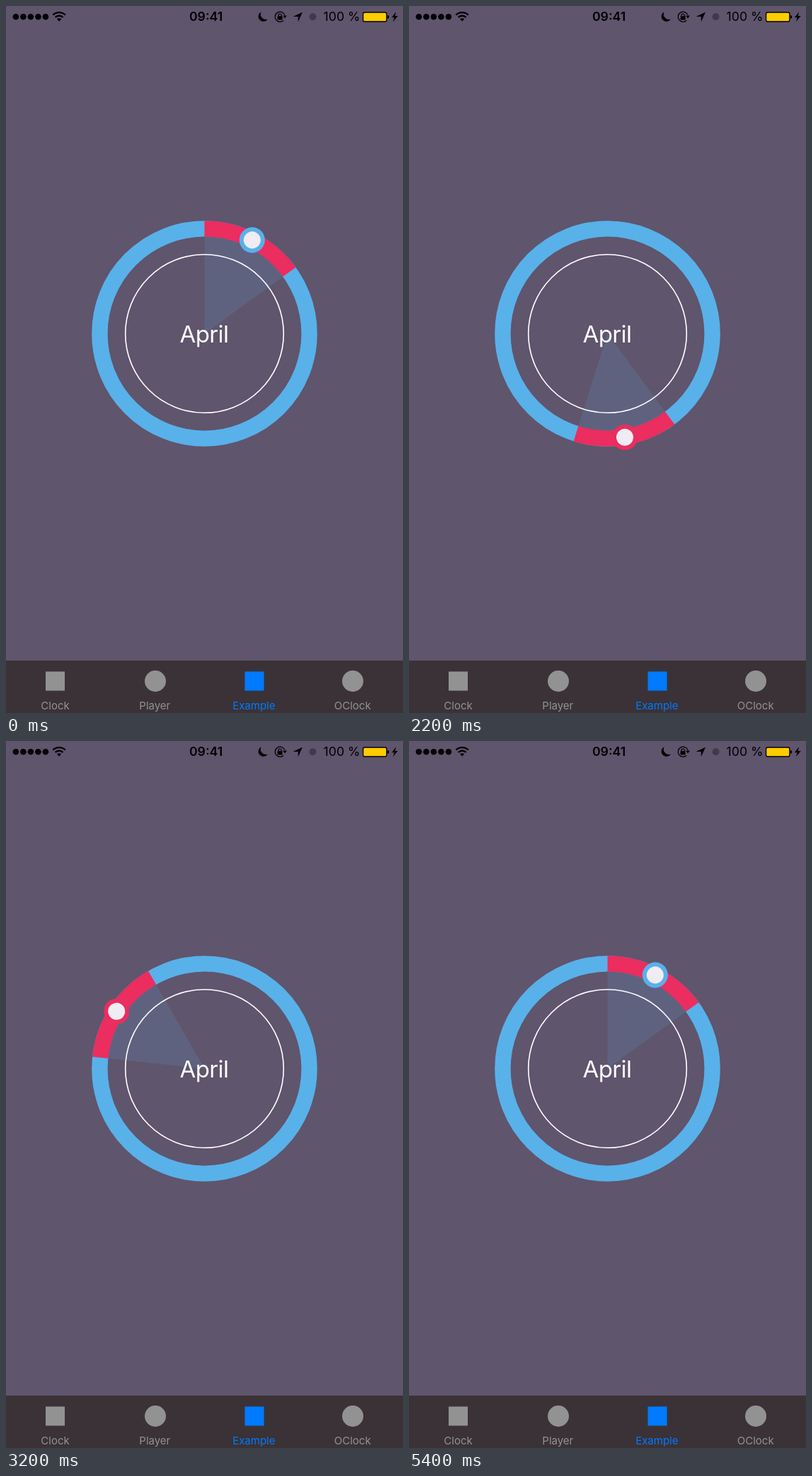
An HTML page that plays this animation: 561x998 px, repeating every 7100 ms.

```html
<!DOCTYPE html>
<html lang="en">
<head>
<meta charset="utf-8">
<title>Circular range slider</title>
<style>
  html, body { margin: 0; width: 100%; height: 100%; overflow: hidden; background: #5f556d; }
  svg { display: block; width: 100%; height: 100%; }
  text { font-family: Inter, Roboto, sans-serif; }
  .tabs { font-size: 15px; text-anchor: middle; fill: #929292; }
  .tabs .active { fill: #007aff; }
  .status { font-size: 17.7px; }
  .ring { fill: none; stroke-width: 22.4; }
  .line { fill: none; stroke: #000; }
</style>
</head>
<body>
<svg viewBox="0 0 561 998">
  <rect width="561" height="998" fill="#5f556d"/>

  <g class="status">
    <g id="signal"></g>
    <g class="line" stroke-width="2.3">
      <path d="M66.4 12.6a12.4 12.4 0 0 1 17.4 0M69.6 16a7.8 7.8 0 0 1 11 0"/>
    </g>
    <path d="M75.1 21.7l-3.1-3.2a4.4 4.4 0 0 1 6.2 0z"/>
    <text x="282.6" y="21.4" text-anchor="middle" font-weight="600">09:41</text>
    <path d="M360.6 8.2a7.2 7.2 0 1 0 9.3 10.2a7.4 7.4 0 0 1-9.3-10.2z"/>
    <path class="line" stroke-width="1.3" d="M393.9 12.5a7.1 7.1 0 1 0-1.8 8.1"/>
    <path d="M391.1 13.4h5.8l-2.9 4z"/>
    <rect x="383.6" y="14.2" width="7" height="5.2" rx=".6"/>
    <path class="line" stroke-width="1.2" d="M385 14.5v-1.4a2.1 2.1 0 0 1 4.2 0v1.4"/>
    <path d="M419 8.8l-6.2 13.4v-7.1h-7.3z"/>
    <circle cx="433.5" cy="15.2" r="5" fill="#403a4a"/>
    <text x="448.6" y="21.4">100 %</text>
    <rect x="504.6" y="9" width="33.2" height="13" rx="2.2" fill="#fc0" stroke="#000" stroke-width="1.3"/>
    <path d="M539 12.8q2.2.4 2.2 2.7t-2.2 2.7z"/>
    <path d="M551.2 8.2l-6.3 8.1h3.8l-1.8 6l6.8-8.4h-4.1z"/>
  </g>

  <g transform="translate(280.5 462.5)">
    <circle class="ring" r="148.1" stroke="#59b1ea"/>
    <g id="range">
      <g transform="rotate(-117)" fill="none" stroke-dasharray="54 306">
        <circle r="68.6" pathLength="360" stroke="#5f627f" stroke-width="137.2"/>
        <circle class="ring" r="148.1" pathLength="360" stroke="#eb2d5f"/>
      </g>
      <circle id="thumb" cy="-148.3" r="15" fill="#efedf3" stroke-width="6"/>
    </g>
    <circle r="111.8" fill="none" stroke="#fff" stroke-width="1.6"/>
    <text x="-.5" y="12.2" text-anchor="middle" font-size="33" letter-spacing="-.5" fill="#fff">April</text>
  </g>

  <rect y="924" width="561" height="74" fill="#3a3236"/>
  <g class="tabs">
    <rect x="56" y="939.5" width="27" height="27"/>
    <text x="69.5" y="993">Clock</text>
    <circle cx="211" cy="953" r="15"/>
    <text x="210.3" y="993">Player</text>
    <g class="active">
      <rect x="337.5" y="939.5" width="27" height="27"/>
      <text x="350.3" y="993">Example</text>
    </g>
    <circle cx="490" cy="953" r="15"/>
    <text x="489.7" y="993">OClock</text>
  </g>
</svg>
<script>
  const LOOP = 7100, TICK = 100;

  // time in ms, thumb angle in degrees clockwise from the top
  const path = [
    [0, 27], [500, 27], [600, 31], [700, 45], [900, 84.2], [1200, 133.4],
    [1400, 163], [1500, 173], [1600, 174.6], [2100, 174.6],
    [2200, 170.5], [2300, 170.5], [2400, 157], [2500, 135.7], [2900, 29.5],
    [3000, -6], [3100, -47.9], [3300, -66], [3500, -77], [3700, -82.3],
    [4400, -82.3], [4500, -63], [4700, 4], [4800, 31.5], [4900, 27], [LOOP, 27]
  ];
  const presses = [[500, 1800], [2200, 3800], [4400, 5400]];

  const byId = id => document.getElementById(id);
  const range = byId('range'), thumb = byId('thumb');

  byId('signal').innerHTML = [0, 1, 2, 3, 4]
    .map(i => `<circle cx="${13.9 + i * 10.5}" cy="15.3" r="4.3"/>`).join('');

  function angleAt(t) {
    const i = path.findIndex(([time]) => time > t);
    const [t0, a0] = path[i - 1], [t1, a1] = path[i];
    return a0 + (a1 - a0) * (t - t0) / (t1 - t0);
  }

  function render(ms) {
    const t = Math.floor(ms % LOOP / TICK) * TICK;
    const pressed = presses.some(([down, up]) => t >= down && t < up);
    range.setAttribute('transform', `rotate(${angleAt(t)})`);
    thumb.setAttribute('stroke', pressed ? '#eb2d5f' : '#59b1ea');
  }

  const start = performance.now();
  function frame() {
    render(performance.now() - start);
    requestAnimationFrame(frame);
  }
  frame();
</script>
</body>
</html>
```
